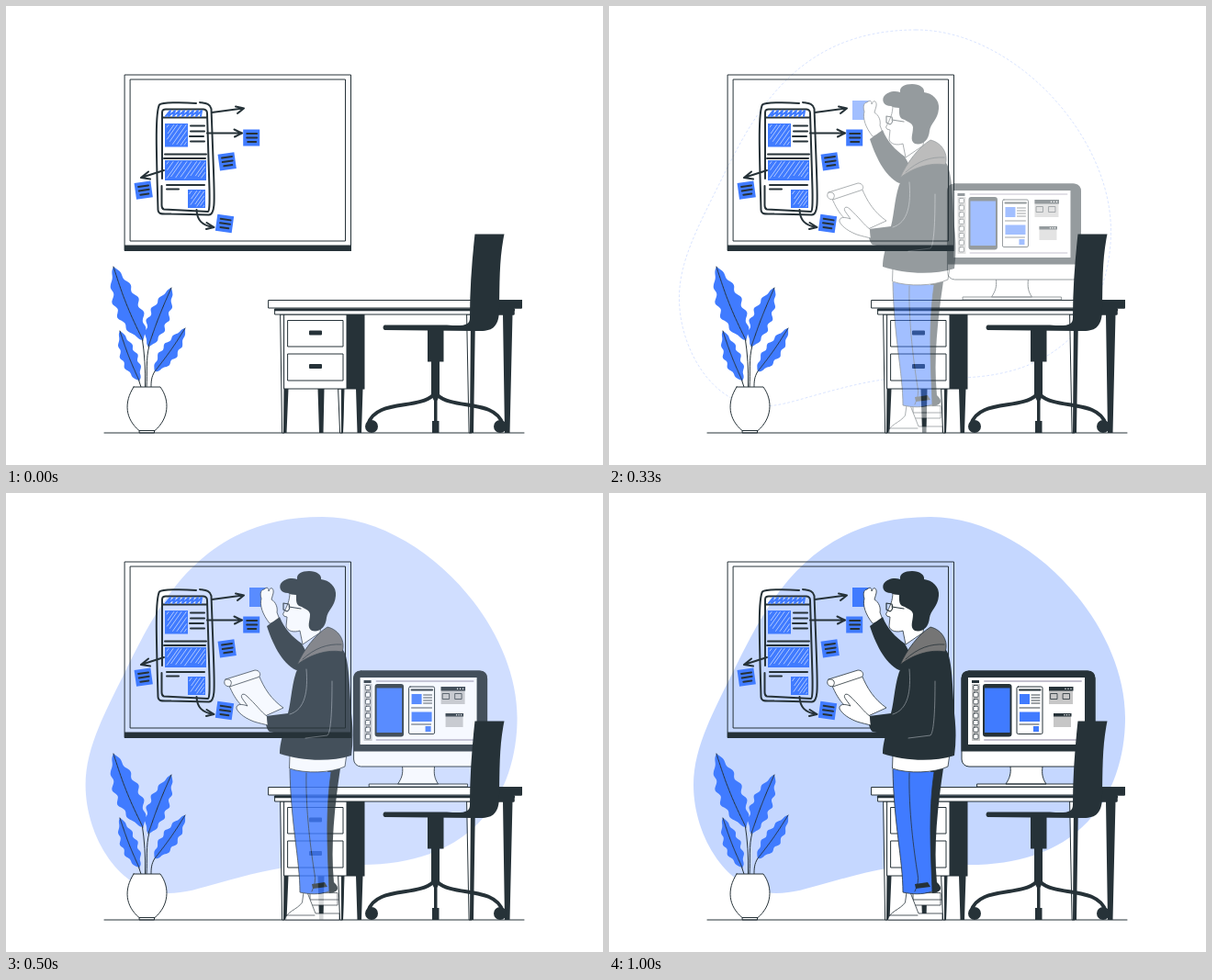
Write an HTML page that moves like this. It is 650 px wide and 500 px high and loops after 1040 ms.

```html
<!DOCTYPE html>
<html lang="en">
<head>
<meta charset="utf-8">
<title>Wireframing at the whiteboard</title>
<style>
  html, body { margin: 0; width: 100%; height: 100%; overflow: hidden; background: #fff; }
  svg { display: block; width: 650px; height: 500px; }
  .d { fill: #263238; stroke: none; }
  .b { fill: #407bff; stroke: none; }
  .w { fill: #fff; }
  .n { fill: none; }
  .g { fill: #c7c7c7; stroke: none; }
  .pen { fill: none; stroke-width: 2; }
  .thin { fill: none; stroke: #8b9298; stroke-width: .8; }
</style>
</head>
<body>
<svg viewBox="0 0 650 500" stroke="#263238" stroke-linecap="round" stroke-linejoin="round">
  <path id="blob" d="M350 26C455 26 562 140 562 245C562 310 530 405 392 405C330 400 290 410 240 424C215 431 200 436 182 436C130 436 92 375 92 318C92 280 110 245 135 195C170 125 215 26 350 26Z"/>

  <!-- whiteboard -->
  <path class="n" d="M129.5 75H375.5V266.5H129.5ZM135.5 80H369.5V256H135.5Z"/>
  <path class="d" d="M129 260.5H376V267H129Z"/>
  <g id="sketch">
    <path class="pen" d="M207 106C190 104.500 170 105 167 107.500C162 117 164 165 165.500 222C166 228 171 226 180 226.500L221 227.500C228 227 227 212 226 180L223.500 112C222 106 217 106 211 105"/>
    <path class="pen" d="M170 188V116Q170 112 175 112.500H215Q219 113 219 117L221.500 200Q222 224 220 224L172 221.500Q169.500 221 169.500 217V196M171 121.500H218"/>
    <path class="pen" d="M201 130.500H216M201 136.500H216M200 142H215M201 147.500H216M173 161.500H218M172 166H217M175 195H216M175 199.500H188"/>
    <path class="pen" d="M224 116L258 111.500M250 109.500L259 111.500L252 117M219 138.500H256M248.500 134.500L257 138.500L249 142.500M172 179L147 187M155 180.500L147 187L157 188.500M207.500 222C208 233 213 239 226 241M218.500 236L226.500 241L218 243"/>
    <path class="n" style="stroke:#407bff;stroke-width:2" d="M174 120l5-6-2 6 7-6-2 6 7-6-2 6 7-6-2 6 7-6-2 6 7-6-2 6 7-6-2 6 6-6-1 6"/>
  </g>

  <!-- plant -->
  <g id="plant">
    <path class="n" d="M148 360C151 380 152 395 151.500 415M156 370C152 384 154 400 153 415M144 406L147 415M162 398C158 404 158 410 158 415"/>
  </g>
  <path class="w" d="M139 415H168C179 430 177 450 162 462.500H145C130 450 128 432 139 415ZM145.500 462.500H161.500V465H145.500Z"/>
  <path d="M107 465H564"/>

  <!-- desk -->
  <path class="w" d="M299 336H303V465H301ZM362 417H368L366.500 465H364ZM502 336H507V465H504.500Z"/>
  <path class="d" d="M303 417H307.500L305.500 465H302ZM339.500 417H346.500L345.500 465H341ZM365 417H368L367 465H365ZM381 417H388.500L387 465H382.500ZM506 336H511L509 465H505ZM541 336H551.500L548.500 465H543Z"/>
  <path class="w" d="M303 336H371V417H303Z"/>
  <path class="d" d="M371 336H390.500V417.500H371Z"/>
  <path class="n" d="M307 342.500H367V371H307ZM307 379H367V408H307Z"/>
  <path class="d" d="M331 353.500H343Q344 353.500 344 354.500V357.500Q344 358.500 343 358.500H331Q330 358.500 330 357.500V354.500Q330 353.500 331 353.500ZM331 390H343Q344 390 344 391V394Q344 395 343 395H331Q330 395 330 394V391Q330 390 331 390Z"/>
  <path class="w" d="M293 330H553V336H293Z"/>
  <path d="M293 331H553" stroke-width="2.500"/>
  <path class="w" d="M286 320.500H561V329H286Z"/>
  <path class="d" d="M536 320H562V329.500H553.500V336.500H536Z"/>

  <g id="monitor">
    <path class="w" d="M437 298C438 306 436 311 432 317H476C472 311 471 306 472 298ZM401 317H508V320H401Z"/>
    <rect class="w" x="384" y="194" width="145" height="104" rx="8"/>
    <path class="d" d="M383.500 281.500V202Q383.500 193.500 392 193.500H521Q529.500 193.500 529.500 202V281.500Z"/>
    <path class="w" stroke="none" d="M391 201H518V274H391Z"/>
    <path class="g" d="M395 208H404V270H395Z"/>
    <path class="d" d="M395 204H403V207H395Z"/>
    <path d="M409 205H514M409 269H514" style="stroke:#c5c1cf;stroke-width:2"/>
    <g id="tools" class="w" stroke-width=".8"></g>
    <rect class="d" x="407" y="208" width="31.500" height="57.500" rx="3"/>
    <path class="b" d="M409 212.500H436.500V261H409Z"/>
    <rect class="w" x="444" y="211" width="28" height="51.500" rx="1.500"/>
    <path d="M447 214.500H469.500" stroke-width="2"/>
    <path class="b" d="M447 219H458V230H447ZM447 238.500H469V249H447ZM462 254H468V260H462Z"/>
    <path class="n" stroke-width=".9" d="M460 220H469M460 223H469M460 226H469M460 229H469M447 234H469M447 252H468"/>
    <path class="g" d="M479 211H505V230H479ZM484 240H503V255H484Z"/>
    <path class="d" d="M479 211H505.500V215.500H479ZM484 240H503.500V243.500H484Z"/>
    <path class="n" stroke-width=".8" d="M481 218.500H488V224.500H481ZM494.500 218.500H501.500V224.500H494.500Z"/>
    <path d="M497 213.300h.01M500 213.300h.01M503 213.300h.01M496 241.800h.01M498.500 241.800h.01M501 241.800h.01" style="stroke:#fff;stroke-width:1.400"/>
  </g>

  <!-- chair -->
  <path class="d" d="M510.500 248.500H542.500C537 275 537.500 300 537 330C537 349 530 354.500 515 354L412 353Q409 350 412 347.500H480C498 349 505 348 505 340C505 310 507 280 510.500 248.500Z"/>
  <path class="d" d="M459 352H476.500V387.500H472V424L469.500 430V452H471.500V465H464V452H466V430L463 424V387.500H459Z"/>
  <path class="n" stroke-width="4" d="M465 424C448 440 402 428 394 456M470 424C487 440 533 428 541 456"/>
  <circle class="d" cx="398" cy="458" r="7"/><circle class="d" cx="538" cy="458" r="7"/>

  <g id="person">
    <path class="w" stroke-width=".8" d="M331 436V449H361V436ZM331 443H362"/>
    <path class="w" stroke-width=".8" d="M324 435L322.500 446C317 454 305 456 303.500 465H363V458H337L328 435M304 460H336"/>
    <path class="d" d="M350 303L364 300C358 340 353 385 357 424C364 430 362 435 352 436L346 420Z"/>
    <path class="b" d="M309 301L354 304C347 350 351 400 352 434C340 438 330 437 320 435C320 400 310 360 309 301Z"/>
    <path class="n" stroke-width=".8" d="M309 301C310 360 320 400 320 435C330 437 340 438 352 434C351 400 347 350 354 304M327 305C326 345 332 390 336 415Q338 424 333 434"/>
    <path class="d" d="M333 426L347 424L350 429L334 431Z"/>
    <path class="w" stroke-width=".8" d="M309 286L308.500 300C325 306 355 305 369 298L371 284Z"/>
    <rect class="b" x="265" y="103" width="20" height="21"/>
    <path class="w" stroke-width=".8" d="M287 142C279 132 276 122 278 115C276 109 278 105 281 105C284 102 286 103 286 107C288 101 292 104 291 109L289 116C294 119 296 125 295 130L298 138Z"/>
    <path class="w" stroke-width=".8" d="M309 108C309 118 306 123 301.500 132Q302 135 306 135L305 145C306 151 314 152 320 150L323 165L342 152L346 112Z"/>
    <path class="d" d="M284 145L298 135C303 148 312 157 322 164L336 190L316 193C300 186 289 161 284 145Z"/>
    <path class="d" d="M322 180L352 165L367 171C374 180 374 215 376 240Q379 265 376 286C350 294 320 291 298 284C298 275 300 270 301 263L287 260C283 257 282 249 283 243L307 240C311 225 311 205 318 190Z"/>
    <path style="fill:#757575" stroke-width=".8" d="M317 187C324 171 337 154 350 146C363 149 370 162 366 173C350 170 331 176 317 187ZM323 181C336 169 350 164 365 165"/>
    <path class="thin" d="M327 192C329 215 326 236 309 241M355 205C355 235 354 260 350 264L326 267"/>
    <path class="d" d="M317 94C316 88 322 85 330 85C338 85 344 89 343 94C352 95 360 102 359 112C358 124 350 128 349 136C348 147 341 152 333 150C327 146 331 140 331 132C330 127 326 127 322 124C315 123 316 116 316 111C312 111 309 110 307 109C299 109 297 103 299 99C303 93 311 92 317 94Z"/>
    <path class="n" stroke-width="1.200" d="M302 120L308 121Q310 127 306 129L302 127ZM308 124L321 126"/>
    <path class="w" stroke-width=".8" d="M243 210C250 226 258 239 282 243L302 234C289 225 281 213 275 198Z"/>
    <path class="w" stroke-width=".8" d="M239 203L271 193C277 193 278 199 275 200.500L245 210.500C238 212 236 206 239 203ZM240 203C245 202 247 207 244 210"/>
    <path class="w" stroke-width=".8" d="M284 243C278 239 272 230 262 221C258 217 254 220 258 225L263 232C258 230 250 229 251 235C254 241 262 246 270 249C276 251 282 252 285 253Z"/>
  </g>
</svg>
<script>
const $ = id => document.getElementById(id);
const add = (id, markup) => $(id).insertAdjacentHTML('beforeend', markup);

let seed = 7;
const rand = () => (seed = seed * 16807 % 2147483647) / 2147483647;

// Marker shading: a blue box with uneven light diagonal gaps
function hatch(x, y, w, h) {
  let gaps = '';
  for (let c = 5; c < w + h * .7; c += 3 + rand() * 3) {
    const at = v => `${x + c - v * .7} ${y + v}`;
    const lo = Math.max(1.5, (c - w + 1.5) / .7), hi = Math.min(h - 1.5, (c - 1.5) / .7);
    if (hi > lo) gaps += `M${at(lo)}L${at(lo + (hi - lo) * (.7 + rand() * .3))}`;
  }
  add('sketch', `<rect class="b" x="${x}" y="${y}" width="${w}" height="${h}"/>
    <path class="n" stroke-width=".7" style="stroke:#dfe8ff" d="${gaps}"/>`);
}
hatch(173, 128, 25, 25.5);
hatch(173, 168, 45, 22);
hatch(198, 200, 19, 20);

function sticky(x, y, angle) {
  add('sketch', `<g transform="translate(${x} ${y}) rotate(${angle})">
    <path class="b" d="M-9-9H9V9H-9Z"/><path class="pen" d="M-5-4.500H6M-5 0H6M-4 4.500H5"/></g>`);
}
sticky(267.2, 143.5, 0);
sticky(240.7, 169.3, -8);
sticky(149.7, 200.7, -8);
sticky(238, 237, 8);

// Wavy leaf from tip to base, bowed sideways
function leaf(x1, y1, x2, y2, width, bow, waves) {
  const dx = x2 - x1, dy = y2 - y1, len = Math.hypot(dx, dy), nx = -dy / len, ny = dx / len;
  const point = (u, off) => {
    const o = off + bow * Math.sin(Math.PI * u);
    return `${(x1 + dx * u + nx * o).toFixed(1)} ${(y1 + dy * u + ny * o).toFixed(1)}`;
  };
  const edge = [], rib = [];
  for (let i = 0; i <= 120; i++) {
    const side = i <= 60 ? 1 : -1, u = i <= 60 ? i / 60 : 2 - i / 60;
    const half = width * Math.abs(Math.sin(Math.PI * u ** 1.15)) ** .65;
    edge.push(point(u, side * half * (1 + .16 * Math.sin(u * waves * 6.283 + side))));
    if (i <= 60) rib.push(point(u, 0));
  }
  add('plant', `<path class="b" d="M${edge.join('L')}Z"/><path class="n" d="M${rib.join('L')}"/>`);
}
leaf(117, 284, 149, 364, 13, 2, 5);
leaf(180, 307, 155, 371, 10.5, 1, 5);
leaf(124, 354, 145, 408, 8.5, 1, 4.5);
leaf(195, 351, 162, 398, 8.5, -1, 4.5);

for (let i = 0; i < 8; i++)
  add('tools', `<rect x="396.800" y="${209.5 + i * 7.6}" width="5.200" height="5.200" rx="1"/>`);

// cubic-bezier(.36, -.01, .5, 1.38)
function ease(x) {
  const bez = (a, b, s) => 3 * a * (1 - s) ** 2 * s + 3 * b * (1 - s) * s * s + s ** 3;
  let lo = 0, hi = 1;
  for (let i = 0; i < 24; i++) {
    const mid = (lo + hi) / 2;
    if (bez(.36, .5, mid) < x) lo = mid; else hi = mid;
  }
  return bez(-.01, 1.38, lo);
}

const LOOP = 1040, stepStart = n => Math.round(n / .24) * 10;

function draw(now) {
  const t = now % LOOP;
  let n = 24;
  while (n > 0 && stepStart(n) > t) n--;
  const p = n ? ease(Math.min(1, (n + 1) / 24)) : 0;
  const shift = `translate(${30 * (p - 1)} 0)`, alpha = Math.min(1, p);

  $('person').setAttribute('opacity', alpha);
  $('monitor').setAttribute('opacity', alpha);
  $('monitor').setAttribute('transform', shift);

  // The backdrop first shows as a faint dotted edge, then fills in
  const blob = $('blob');
  blob.setAttribute('transform', shift);
  blob.setAttribute('fill', n > 8 ? `rgba(64,123,255,${.3 * alpha})` : 'none');
  blob.setAttribute('stroke', n === 8 ? '#cfdcff' : 'none');
  blob.setAttribute('stroke-dasharray', '2 3');
  blob.setAttribute('stroke-width', .8);
  requestAnimationFrame(draw);
}
draw(0);
</script>
</body>
</html>
```
